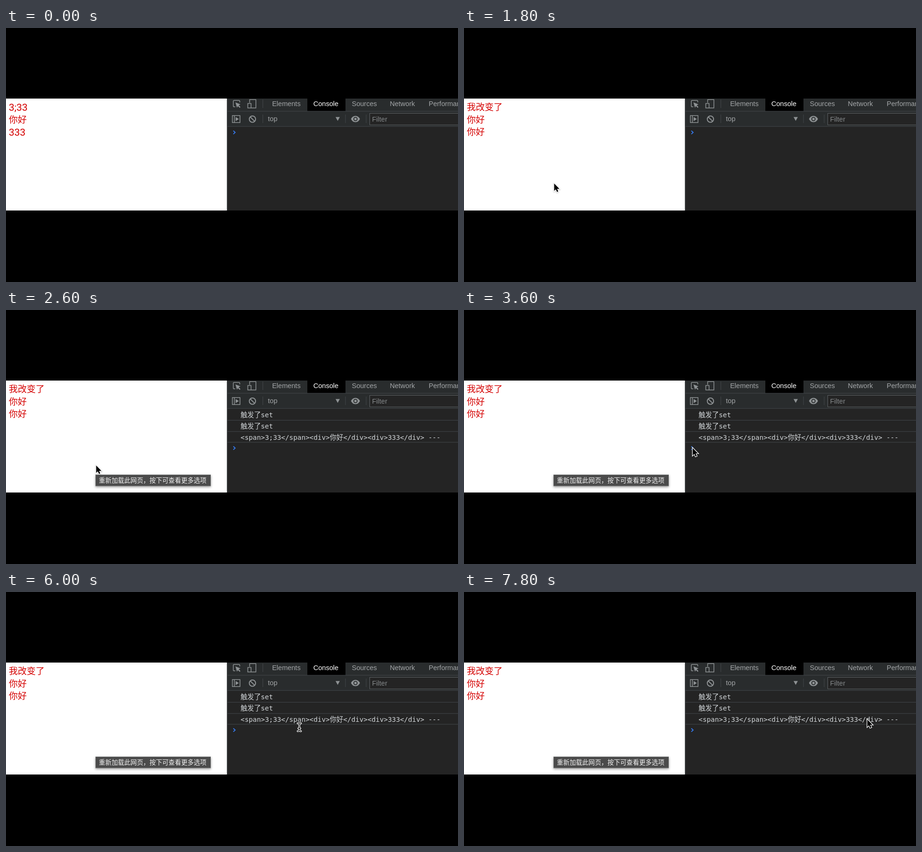
An HTML page that plays this animation: 960x540 px, repeating every 8000 ms.

```html
<!DOCTYPE html>
<html lang="zh-CN">
<head>
<meta charset="utf-8">
<title>Console demo</title>
<style>
  html, body { margin: 0; width: 100%; height: 100%; overflow: hidden; background: #000; }
  svg { display: block; width: 960px; height: 540px; }
  text { white-space: pre; }
  .page { font: 19px "Noto Sans CJK SC", "Noto Sans CJK", sans-serif; fill: #d40000; }
  .page .num { font: 21px Roboto, sans-serif; }
  .ui { font: 14.5px "Liberation Sans", Arial, sans-serif; fill: #a3a6a8; }
  .log { font: 14.3px "DejaVu Sans Mono", "Noto Sans CJK SC", "Noto Sans CJK", monospace; fill: #d2d6d9; }
  .tip { font: 13.45px "Noto Sans CJK SC", "Noto Sans CJK", sans-serif; fill: #f2f2f2; }
  .icon { fill: none; stroke: #8e9294; stroke-width: 1.5; }
  .solid { fill: #8e9294; stroke: none; }
  .rule { fill: none; stroke: #43474a; }
</style>
</head>
<body>
<svg viewBox="0 0 960 540">
  <defs>
    <filter id="soft" x="-20%" y="-60%" width="140%" height="240%">
      <feDropShadow dx="0" dy="2" stdDeviation="2.5" flood-opacity=".4"/>
    </filter>
    <filter id="faint" x="-50%" y="-50%" width="200%" height="200%">
      <feDropShadow dx="0" dy="1" stdDeviation="1" flood-opacity=".35"/>
    </filter>
  </defs>
  <rect width="960" height="540"/>
  <rect y="150" width="469.5" height="238" fill="#fff"/>

  <g id="before" class="page">
    <text class="num" x="6" y="176">3;33</text>
    <text x="6" y="201.5">你好</text>
    <text class="num" x="6" y="228.5">333</text>
  </g>
  <g id="after" class="page">
    <text x="6" y="175.3">我改变了</text>
    <text x="6" y="201.5">你好</text>
    <text x="6" y="228">你好</text>
  </g>

  <!-- developer tools panel -->
  <rect x="469.5" y="150" width="490.5" height="238" fill="#242424"/>
  <rect x="469.5" y="150" width="490.5" height="59" fill="#292c2d"/>
  <rect x="640" y="150" width="81" height="27"/>
  <path class="rule" d="M470 150V388M470 177H960M470 209.3H960M545.5 152V170M545.5 184V202M721 184V202M765 184V202"/>
  <rect x="772.5" y="181.5" width="200" height="24.5" fill="#242424" stroke="#5d6163"/>
  <g class="ui">
    <text x="565.2" y="165.8">Elements</text>
    <text x="652.8" y="165.8" fill="#fff" style="fill:#fff">Console</text>
    <text x="734.5" y="165.8">Sources</text>
    <text x="815.3" y="165.8">Network</text>
    <text x="897.8" y="165.8">Performance</text>
    <text x="556.3" y="198">top</text>
    <text x="777.5" y="199" style="fill:#85898b">Filter</text>
  </g>
  <g class="icon">
    <path d="M487 167.5H484.5Q482.7 167.5 482.7 165.7V155.8Q482.7 154 484.5 154H494.7Q496.5 154 496.5 155.8V158"/>
    <path class="solid" d="M487.3 158.3L498 162.3L494.2 164.2L498 168L496.3 169.7L492.5 165.9L490.6 169.5Z"/>
    <path d="M517.5 159V152.3H530.7V170H520.5M513.5 160.5H520.5V170H513.5Z"/>
    <path d="M480.7 186.2H497V201H480.7ZM485 186V201"/>
    <path class="solid" d="M487.7 189.3L494.5 193.6L487.7 198Z"/>
    <circle cx="523.4" cy="193.7" r="6.7" stroke-width="2"/>
    <path d="M518.7 189L528.1 198.4" stroke-width="2"/>
    <path class="solid" d="M700 189.3H709L704.5 197.5Z"/>
    <path class="solid" d="M732.7 193.5Q736 186.8 742.2 186.8T751.8 193.5Q748.5 200.2 742.2 200.2T732.7 193.5Z"/>
    <circle cx="742.2" cy="193.5" r="3.6" stroke="#292c2d" stroke-width="1.8"/>
  </g>

  <g id="logs">
    <path class="rule" d="M470 234.4H960M470 258.3H960M470 281.2H960"/>
    <g class="log">
      <text x="498.3" y="228">触发了set</text>
      <text x="498.3" y="251.8">触发了set</text>
      <text x="498.3" y="275.6">&lt;span&gt;3;33&lt;/span&gt;&lt;div&gt;你好&lt;/div&gt;&lt;div&gt;333&lt;/div&gt; ---</text>
    </g>
  </g>
  <path id="prompt" d="M-2.2 -3.6L1.7 0L-2.2 3.6" fill="none" stroke="#367cf1" stroke-width="1.8"/>

  <g id="tip">
    <rect x="190.5" y="350.5" width="244" height="23.5" fill="#4b4c4c" stroke="#6b6c6c" filter="url(#soft)"/>
    <text class="tip" x="197.3" y="367.2">重新加载此网页，按下可查看更多选项</text>
  </g>

  <path id="arrow" filter="url(#faint)" d="M0 0V15.8L3.6 12.4L6 18L8.7 16.9L6.3 11.4H11.2Z" stroke="#fff" stroke-width="2.4" paint-order="stroke"/>
  <g id="beam" fill="none" stroke-linecap="round">
    <path id="stem" d="M-3.5 -8.3Q0 -8.3 0 -5.5Q0 -8.3 3.5 -8.3M0 -5.5V5.5M-3.5 8.3Q0 8.3 0 5.5Q0 8.3 3.5 8.3M-2 2.5H2" stroke="#fff" stroke-width="3.8"/>
    <use href="#stem" id="core"/>
  </g>
</svg>
<script>
const LOOP = 8000, STEP = 200;
const TEXT_AT = 1400, LOGS_AT = 2000, TIP_AT = 2600;

// pointer stops: time, shape, x, y
const stops = [
  [200, "arrow", 191.5, 330.5],
  [3200, "arrow", 265, 322],
  [3400, "arrow", 410, 303],
  [3600, "arrow", 485.7, 293.5],
  [3800, "beam", 528, 294],
  [4000, "beam", 549, 294],
  [4200, "beam", 555, 294],
  [4600, "beam", 582, 292],
  [4800, "beam", 612, 288],
  [5000, "beam", 623, 287.5],
  [6600, "arrow", 700, 278],
  [6800, "arrow", 780.5, 274],
  [7000, "arrow", 818, 273],
  [7200, "arrow", 842, 273],
  [7400, "arrow", 853, 273],
  [7600, "arrow", 855.5, 273],
  [7800, "arrow", 856.5, 271]
];

const el = id => document.getElementById(id);
const show = (id, on) => el(id).setAttribute("visibility", on ? "visible" : "hidden");
const place = (id, x, y) => el(id).setAttribute("transform", `translate(${x} ${y})`);

// dark centre line over the light outline of the text pointer
const core = el("stem").cloneNode();
core.removeAttribute("id");
core.setAttribute("stroke", "#000");
core.setAttribute("stroke-width", 1.3);
el("core").replaceWith(core);

function draw(ms) {
  const t = Math.floor((ms % LOOP) / STEP) * STEP;
  show("before", t < TEXT_AT);
  show("after", t >= TEXT_AT);
  show("logs", t >= LOGS_AT);
  show("tip", t >= TIP_AT);
  place("prompt", 485, t >= LOGS_AT ? 293.5 : 222);

  const [, shape, x, y] = stops.filter(s => s[0] <= t).pop() || [];
  for (const id of ["arrow", "beam"]) {
    show(id, id === shape);
    if (id === shape) place(id, x, y);
  }
}

let start;
function tick(now) {
  start ??= now;
  draw(now - start);
  requestAnimationFrame(tick);
}
draw(0);
requestAnimationFrame(tick);
</script>
</body>
</html>
```
